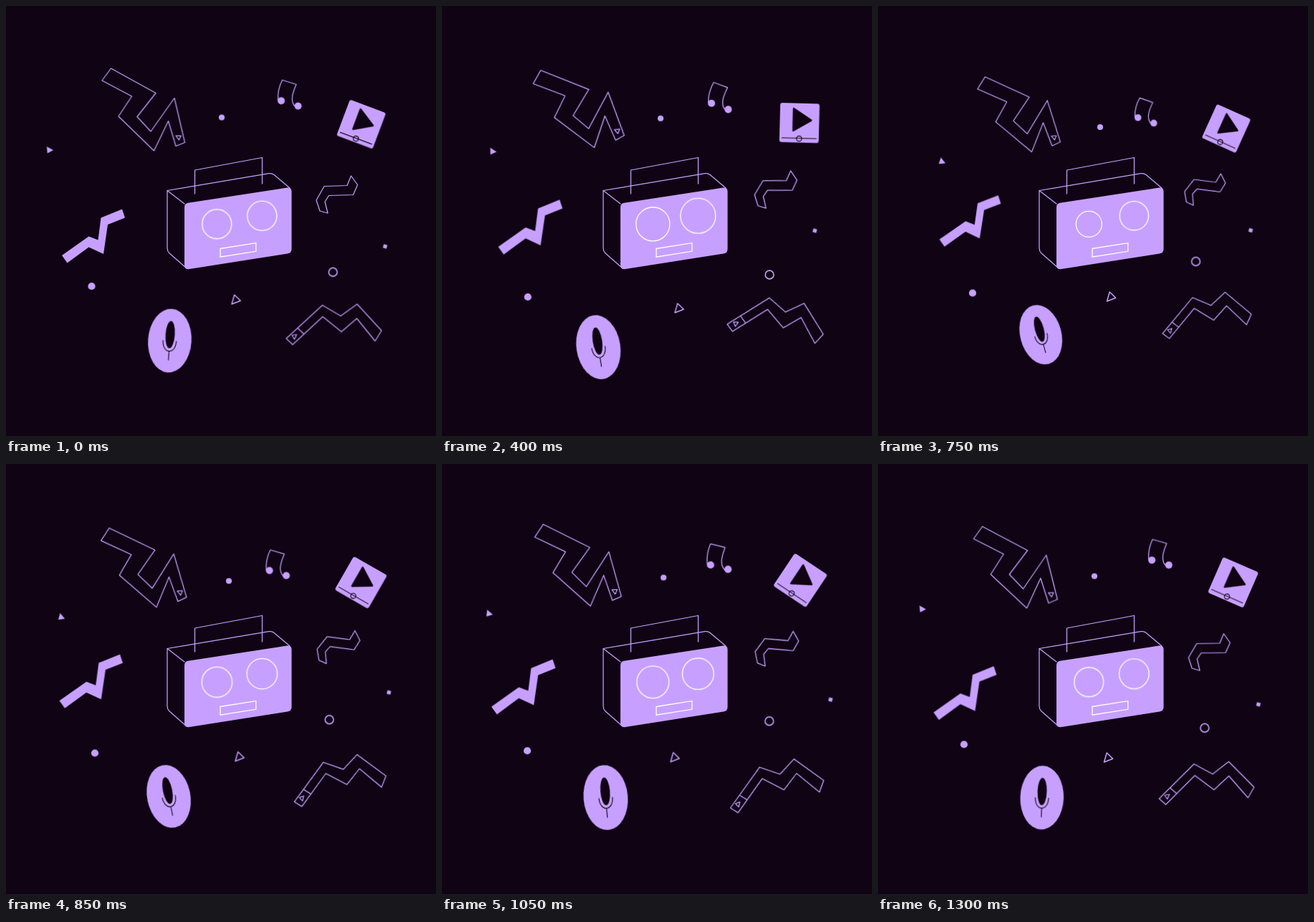
An HTML page without scripts for the animation above (1.35 s loop, 600x600 px).

```html
<!DOCTYPE html>
<html lang="en">
<head>
<meta charset="utf-8">
<title>Dancing boombox</title>
<style>
html, body { margin: 0; height: 100%; overflow: hidden; background: #100314; }
svg { display: block; width: 100vw; height: 100vh; --ink: #100314; --glow: #c7a0ff; }
.line { fill: none; stroke: var(--glow); stroke-width: 1.25; stroke-linejoin: round; stroke-linecap: round; }
.fill { fill: var(--glow); }
.dark { fill: var(--ink); stroke: var(--ink); stroke-linejoin: round; }
.thin { fill: none; stroke: var(--ink); stroke-width: 1.1; }
.white { fill: none; stroke: #fff; stroke-width: 1.3; vector-effect: non-scaling-stroke; }

/* Every part shares one beat; --a to --g are its poses. Motion advances every 50 ms. */
.move { animation: beat 1350ms infinite; }
@keyframes beat {
  0% { transform: var(--a); animation-timing-function: steps(4); }
  14.8148% { transform: var(--b); animation-timing-function: linear(0 0% 25%, .156 25% 50%, .5 50% 75%, .844 75% 100%, 1 100%); }
  29.6296% { transform: var(--c); animation-timing-function: linear(0 0% 14.286%, .055 14.286% 28.571%, .198 28.571% 42.857%, .394 42.857% 57.143%, .606 57.143% 71.429%, .802 71.429% 85.714%, .945 85.714% 100%, 1 100%); }
  55.5555% { transform: var(--d); animation-timing-function: linear(0 0% 25%, .156 25% 50%, .5 50% 75%, .844 75% 100%, 1 100%); }
  70.3703% { transform: var(--e); animation-timing-function: steps(4); }
  85.1851% { transform: var(--f); animation-timing-function: steps(3); }
  96.2962% { transform: var(--g); animation-timing-function: step-end; }
  100% { transform: var(--a); }
}

#bolt {
  --a: translate(197.5px, 139px) rotate(0deg) scale(1);
  --b: translate(198px, 140.5px) rotate(-5.8deg) scale(.985);
  --c: translate(195.5px, 135.5px) rotate(-7.2deg) scale(1.012);
  --d: translate(201.5px, 144.5px) rotate(-4.3deg) scale(.95);
  --e: translate(193.5px, 131.5px) rotate(-2.3deg) scale(1.034);
  --f: translate(197px, 138px) rotate(-2.6deg) scale(.997);
  --g: translate(197.5px, 138.3px) rotate(-1deg) scale(1);
}
#note {
  --a: translate(395.8px, 135.8px) rotate(0deg) scale(1);
  --b: translate(392.5px, 136.3px) rotate(-2deg) scale(.97);
  --c: translate(387.8px, 140px) rotate(3deg) scale(1.01);
  --d: translate(373.8px, 159.5px) rotate(2deg) scale(.95);
  --e: translate(385px, 144.8px) rotate(-3deg) scale(1.04);
  --f: translate(389px, 143px) rotate(-3deg) scale(1);
  --g: translate(394px, 137.5px) rotate(-1deg) scale(1);
}
#player {
  --a: translate(495.7px, 165px) rotate(20.5deg) scale(.993);
  --b: translate(492px, 167px) rotate(.3deg) scale(.99);
  --c: translate(498.8px, 163.2px) rotate(1.5deg) scale(1.015);
  --d: translate(486px, 171px) rotate(24.3deg) scale(.96);
  --e: translate(504.5px, 159.7px) rotate(35.4deg) scale(1.03);
  --f: translate(495.5px, 165px) rotate(32deg) scale(1);
  --g: translate(495.6px, 165.3px) rotate(23.6deg) scale(1);
}
#ribbon {
  --a: translate(465px, 263px) rotate(0deg) scale(1);
  --b: translate(460.5px, 260px) rotate(-3.7deg) scale(.965);
  --c: translate(469px, 256px) rotate(1.5deg) scale(1.02);
  --d: translate(459px, 256px) rotate(9deg) scale(.95);
  --e: translate(474.5px, 255px) rotate(9deg) scale(1.035);
  --f: translate(466px, 260.5px) rotate(4.5deg) scale(1);
  --g: translate(465.5px, 262.5px) rotate(1deg) scale(1);
}
#streak {
  --a: translate(124px, 321px) rotate(0deg) scale(1);
  --b: translate(130px, 317px) rotate(0deg) scale(.99);
  --c: translate(125.3px, 308.5px) rotate(0deg) scale(1.02);
  --d: translate(130.5px, 300px) rotate(.7deg) scale(.968);
  --e: translate(111px, 306.5px) rotate(-.5deg) scale(1.04);
  --f: translate(120.5px, 315.5px) rotate(0deg) scale(1);
  --g: translate(123.5px, 319.6px) rotate(0deg) scale(1);
}
#mic {
  --a: translate(228.5px, 467px) rotate(4deg) scale(1);
  --b: translate(223px, 469px) rotate(0deg) scale(.988);
  --c: translate(218.2px, 476px) rotate(-9deg) scale(1.01);
  --d: translate(227.2px, 458.7px) rotate(-15deg) scale(.95);
  --e: translate(227px, 469px) rotate(-8deg) scale(1.04);
  --f: translate(229.8px, 462px) rotate(-1.5deg) scale(1);
  --g: translate(228.8px, 465.5px) rotate(2deg) scale(1);
}
#wave {
  --a: translate(457.5px, 458.5px) rotate(0deg) scale(1);
  --b: translate(456px, 450px) rotate(13.4deg) scale(.985);
  --c: translate(465px, 451px) rotate(10.7deg) scale(1.01);
  --d: translate(459px, 443.5px) rotate(-7.6deg) scale(.95);
  --e: translate(473.5px, 463px) rotate(-14.6deg) scale(1.04);
  --f: translate(461.5px, 458.5px) rotate(-8.8deg) scale(.995);
  --g: translate(458.5px, 459px) rotate(-2.2deg) scale(1);
}
#eyeL { --a: scale(1); --b: scale(.8); --c: scale(1.15); --d: scale(.88); --e: scale(1.19); --f: scale(1); --g: scale(1); }
#eyeR { --a: scale(1); --b: scale(.66); --c: scale(1.19); --d: scale(.98); --e: scale(1.08); --f: scale(1.05); --g: scale(1.01); }
#dot1 {
  --a: translate(301px, 155.5px); --b: translate(301px, 158.7px); --c: translate(305px, 156.8px); --d: translate(310px, 169px);
  --e: translate(312px, 157.5px); --f: translate(306.2px, 159.5px); --g: translate(302px, 156.5px);
}
#dot2 {
  --a: translate(119.5px, 391px); --b: translate(122.5px, 396px); --c: translate(119.7px, 406px); --d: translate(132px, 400.5px);
  --e: translate(116px, 406.2px); --f: translate(122px, 394px); --g: translate(120px, 391.3px);
}
#chip {
  --a: translate(60.3px, 200.8px) rotate(0deg); --b: translate(69.5px, 201.3px) rotate(2deg);
  --c: translate(70.5px, 202.8px) rotate(5deg); --d: translate(89px, 217px) rotate(24deg);
  --e: translate(65px, 210.4px) rotate(20deg); --f: translate(65.8px, 207px) rotate(5deg);
  --g: translate(61.3px, 202.3px) rotate(1deg);
}
#delta {
  --a: translate(320.5px, 410px); --b: translate(325px, 415.7px); --c: translate(330.5px, 422px); --d: translate(325px, 406px);
  --e: translate(326px, 411.2px); --f: translate(323px, 408px); --g: translate(321px, 410px);
}
#pixel {
  --a: translate(529px, 335.5px); --b: translate(514.7px, 323.5px); --c: translate(520.2px, 313.5px); --d: translate(520px, 313px);
  --e: translate(548.6px, 324.5px); --f: translate(535.7px, 333px); --g: translate(530.8px, 335.5px);
}
#ring {
  --a: translate(456.2px, 371.3px); --b: translate(455.5px, 373.8px); --c: translate(457px, 375px); --d: translate(443.5px, 356.5px);
  --e: translate(458.8px, 357px); --f: translate(454.5px, 360.5px); --g: translate(455.8px, 368.3px);
}
</style>
</head>
<body>
<svg viewBox="0 0 600 600">
  <g id="boombox">
    <path class="line" d="M263.5 262V229L357.5 211.5V248"/>
    <path class="line" d="M249 276L225 257.5V338Q225 342 228 345L252 366M225 257.5L367 233.7Q371 233 374 235.5L396 254"/>
    <path class="fill" d="M254 274.8L392 253.6Q398.500 252.700 398.500 258.500V339Q398.500 344.500 393 345.500L256 367Q249 368 249 361.500V281Q249 275.600 254 274.800Z"/>
    <path class="white" d="M299 338.500L348.800 330.700V342.300L299 350.200Z"/>
    <g transform="translate(294.300 304.300)"><circle id="eyeL" class="white move" r="20.500"/></g>
    <g transform="translate(357.300 292.700)"><circle id="eyeR" class="white move" r="20.600"/></g>
  </g>

  <g id="bolt" class="move">
    <g class="line" transform="translate(-197.5 -139)">
      <path d="M146.500 87L209 121.500L183 154.500L202 175L235 128.500L249.500 190.500L237 195.500L226.500 160.500L206.500 202L157 154L175.500 126L134 104Z"/>
      <path d="M237 181H244.300L241.300 187Z"/>
    </g>
  </g>

  <g id="note" class="move">
    <g transform="translate(-395.8 -135.8)">
      <path class="line" d="M379.500 131C379 121 381.500 111 385.500 103.300L405 109.300C400 121 396 132 403 140"/>
      <circle class="fill" cx="384" cy="132.200" r="5"/>
      <circle class="fill" cx="407.500" cy="139.500" r="5"/>
    </g>
  </g>

  <g id="player" class="move">
    <rect class="fill" x="-27" y="-27" width="54" height="54" rx="3"/>
    <path class="dark" stroke-width="2.500" d="M-8.300 -19.500L16 -4L-8.300 10.500Z"/>
    <path class="thin" d="M-24 21H24"/>
    <circle class="thin" cy="21.500" r="3.600"/>
  </g>

  <g id="ribbon" class="move">
    <path class="line" transform="translate(-465 -263)" d="M481.500 237L490.500 249.500L484.500 263.500L450.500 264.500L445 273L449 289L438 286L433 271L444 251.500L476 250.500Z"/>
  </g>

  <g id="streak" class="move">
    <path class="fill" transform="translate(-124 -321)" d="M162 283.500L166 295.500L142 305L136 346L115.500 336.500L85.500 358.500L78 348L115.500 321.500L128.500 326.500L132.500 295.500Z"/>
  </g>

  <g id="mic" class="move">
    <ellipse class="fill" rx="30.300" ry="44.500"/>
    <ellipse cy="-8.500" rx="6.500" ry="19" fill="#100314"/>
    <path class="thin" d="M-9.300 0C-9.300 19.500 9.300 19.500 9.300 0M0 14.500V27.500"/>
  </g>

  <g id="wave" class="move">
    <g class="line" transform="translate(-457.5 -458.5)">
      <path d="M391 464L441.500 417.500L467 432.500L490 416L524 453L515 467.500L489.500 436L468 454.500L442 433.500L400 472.500Z"/>
      <path d="M407 449.500L415.500 457.500M399 459.500L405.500 458.500L402.500 465Z"/>
    </g>
  </g>

  <circle id="dot1" class="fill move" r="4.100"/>
  <circle id="dot2" class="fill move" r="5.100"/>
  <path id="chip" class="fill move" d="M-3.500 -4.700L5.700 .2L-2.500 4.700Z"/>
  <path id="delta" class="line move" style="stroke-width:1.5" d="M-1.800 -7L6.700 1.200L-5.500 6Z"/>
  <g id="pixel" class="move"><rect class="fill" x="-2.600" y="-2.600" width="5.200" height="5.200" transform="rotate(15)"/></g>
  <circle id="ring" class="line move" style="stroke-width:1.6" r="5.900"/>
</svg>
</body>
</html>
```
